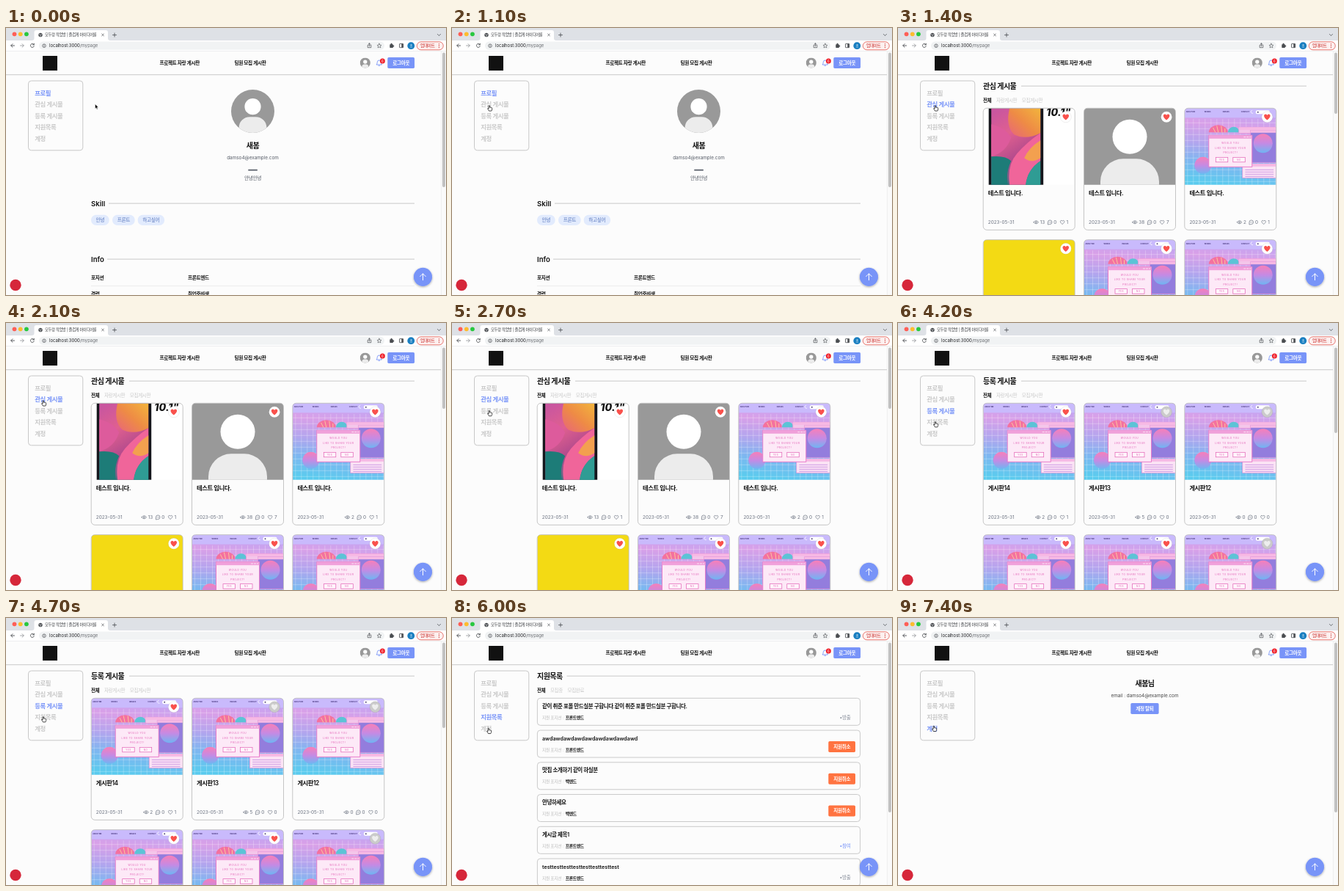
An HTML page that plays this animation: 600 px wide and 364 px high, repeating every 7.5 s.

```html
<!DOCTYPE html>
<html lang="ko">
<head>
<meta charset="utf-8">
<title>My page</title>
<style>
  html, body { margin: 0; width: 100%; height: 100%; overflow: hidden; background: #fcfcfc; }
  svg { display: block; width: 100vw; height: 100vh; }
  text { font-family: Inter, "Noto Sans CJK KR", "Noto Sans CJK JP", "Noto Sans CJK", sans-serif; white-space: pre; }
</style>
</head>
<body>
<svg id="stage" viewBox="0 0 600 364" xmlns="http://www.w3.org/2000/svg"></svg>
<script>
const LOOP = 7500;
const BLUE = '#7894f8', INK = '#111', PALE = '#c9c9c9', SLATE = '#6b7280';
const EMAIL = 'damso4@example.com', NICKNAME = '새봄';

// ---------- drawing helpers ----------
const rect = (x, y, w, h, fill, rx = 0, extra = '') =>
  `<rect x="${x}" y="${y}" width="${w}" height="${h}" rx="${rx}" fill="${fill}" ${extra}/>`;
const circle = (x, y, r, fill, extra = '') => `<circle cx="${x}" cy="${y}" r="${r}" fill="${fill}" ${extra}/>`;
const shape = (d, fill) => `<path d="${d}" fill="${fill}"/>`;
const stroke = (d, color, width = 1) =>
  `<path d="${d}" fill="none" stroke="${color}" stroke-width="${width}" stroke-linecap="round" stroke-linejoin="round"/>`;
const at = (x, y, body) => `<g transform="translate(${x} ${y})">${body}</g>`;
const scaled = (x, y, k, body) => `<g transform="translate(${x} ${y}) scale(${k})">${body}</g>`;
const use = id => `<use href="#${id}"/>`;

// y is the vertical middle of the line; Hangul is set tighter than Latin.
function text(x, y, str, { size = 6.67, fill = INK, weight = 400, anchor = 'start' } = {}) {
  const hangul = /[가-힣]/.test(str);
  const px = hangul ? size : size * 0.955;
  return `<text x="${x}" y="${y + size * 0.36}" font-size="${px}" fill="${fill}" font-weight="${weight}"
    text-anchor="${anchor}" letter-spacing="${hangul ? -0.055 * px : 0}">${str}</text>`;
}
const button = (x, y, w, label, fill = BLUE) =>
  rect(x, y, w, 15, fill, 1.7) +
  text(x + w / 2, y + 7.5, label, { fill: '#fff', weight: 600, anchor: 'middle' });
const heading = (y, label, lineX) =>
  text(116, y, label, { size: 10, weight: 600 }) + rect(lineX, y - .6, 557 - lineX, 1.6, '#dcdcdc');
const gradient = (id, stops, dir = 'x1="0" y1="0" x2="0" y2="1"') =>
  `<linearGradient id="${id}" ${dir}>${stops.map((c, i) =>
    `<stop offset="${i / (stops.length - 1)}" stop-color="${c}"/>`).join('')}</linearGradient>`;

const HEART = 'M0 3.8C-5.2 .4-4.4-3.4-2-3.4Q-.6-3.4 0-2.1Q.6-3.4 2-3.4C4.4-3.4 5.2 .4 0 3.8Z';

// ---------- pictures on the cards (125 x 104.5) ----------
const portrait = rect(0, 0, 125, 125, '#999') + circle(62.5, 49, 23.5, '#fff') +
  shape('M22.5 125V110A31 31 0 0 1 53.5 79H71.5A31 31 0 0 1 102.5 110V125Z', '#ececec');

function artwork() {
  let grid = '', keys = '';
  for (let x = 4; x < 125; x += 8) grid += `M${x} 15V105`;
  for (let y = 20; y < 105; y += 8) grid += `M0 ${y}H125`;
  for (let y = 84; y < 94; y += 3) keys += `M83 ${y}H121`;
  const tiny = (x, y, s, size) =>
    `<text x="${x}" y="${y}" font-size="${size}" fill="#e25fb4" text-anchor="middle" letter-spacing=".5">${s}</text>`;
  const nav = ['ABOUT ME', 'WORKS', 'IMAGES', 'CONTACT'].map((s, i) =>
    `<text x="${2 + 25 * i}" y="6" font-size="2.3" font-weight="700" fill="#4b3a80">${s}</text>`).join('');
  const pane = (x, y, w, h, fill) =>
    rect(x, y, w, h, fill, 0, 'stroke="#e98fd6" stroke-width=".7"') + rect(x, y, w, 3.5, '#f7b9e4');
  return rect(0, 0, 125, 105, 'url(#sky)') + stroke(grid, '#ffffff80', .5) +
    rect(0, 0, 125, 13, '#c9bafc') + nav +
    stroke('M92 3A2 2 0 1 0 93 7', '#fff', .7) + rect(97, 3, 19, 5, '#fff', 2) + circle(100, 5.5, 1, '#55477d') +
    shape('M33 33A13 10 0 0 1 59 33Z', '#f4719f') +
    stroke('M39 27L42 33M44 24.500L46 33M50 24.500L51 33M55 28L55 33', '#fbc4a0', 1) +
    shape('M59 33A8 7.500 0 0 1 75 33Z', '#5cc3d6') +
    pane(74, 26, 52, 8, '#f4c6ea') +
    pane(90, 30, 36, 44, '#937ddd') + circle(107, 48, 13, 'url(#ball)') +
    pane(79, 76, 46, 19, '#fbe3f5') + stroke(keys, '#cf9be4', 1) +
    circle(25, 78, 11.5, 'url(#ball)') +
    rect(33, 37, 59, 43, '#fde9f7', 0, 'stroke="#e774c6" stroke-width=".9"') + rect(33, 37, 59, 4.5, '#f0a0da') +
    stroke('M81 39.300H83M85 39.300H87M89 39.300H90', '#fff', .7) +
    tiny(62.5, 49, 'WOULD YOU', 3.2) + tiny(62.5, 55.5, 'LIKE TO SHARE YOUR', 3.2) + tiny(62.5, 62, 'PROJECT!', 3.2) +
    [42.5, 66].map(x => rect(x, 67, 16.5, 6.5, '#fff5fb', 0, 'stroke="#e25fb4" stroke-width=".7"')).join('') +
    tiny(50.8, 71.4, 'YES', 3) + tiny(74.3, 71.4, 'NO', 3);
}

// a tablet lying on white, its screen a swirl of soft bands
const tablet = rect(0, 0, 125, 105, '#fff') + rect(7.5, 0, 74.5, 105, '#16171d') +
  rect(11, 0, 67, 105, 'url(#screen)') +
  shape('M36 0H78V34Q58 44 42 36Q30 24 36 0Z', 'url(#amber)') +
  shape('M11 22Q30 26 38 40Q32 60 11 66Z', '#dd5b9c') +
  shape('M78 34Q60 46 46 62T36 105H58Q60 84 78 72Z', '#f0659a') +
  shape('M78 44Q62 54 56 68Q66 76 78 68Z', '#f3a04f') +
  shape('M11 66Q30 64 38 72Q30 90 34 105H11Z', '#1d7c78') +
  shape('M78 72Q60 84 58 105H78Z', '#2f9c94') +
  '<text x="86" y="11" font-size="14" font-weight="800" font-style="italic" fill="#111">10.1"</text>';

const defs = `<defs>
  ${gradient('sky', ['#bda6f4', '#d9a0e8', '#b3a5ee', '#7db7f0', '#5bcbee'], 'x1=".6" y1="0" x2=".45" y2="1"')}
  ${gradient('ball', ['#f77fb8', '#c58ae4', '#6fb5f2'])}
  ${gradient('screen', ['#c9569f', '#e0608f', '#b24a8d', '#2a7d7f'], 'x1=".2" y1="0" x2=".6" y2="1"')}
  ${gradient('amber', ['#f2b53c', '#ee8b45', '#e8647c'], 'x1="1" y1="0" x2="0" y2="1"')}
  <clipPath id="cover"><path d="M0 104.500V5Q0 0 5 0H120Q125 0 125 5V104.500Z"/></clipPath>
  <clipPath id="disc"><circle cx="62.500" cy="62.500" r="62.500"/></clipPath>
  <filter id="soft" x="-50%" y="-50%" width="200%" height="200%">
    <feDropShadow dx="0" dy="1" stdDeviation="1.500" flood-opacity=".35"/></filter>
  <g id="portrait">${portrait}</g>
  <g id="round"><g clip-path="url(#disc)">${portrait}</g></g>
  <g id="artwork">${artwork()}</g>
  <g id="tablet">${tablet}</g>
  <g id="yellow">${rect(0, 0, 125, 105, '#f3da14')}</g>
</defs>`;

// ---------- browser window and site header ----------
function chrome() {
  const dark = '#4a4d51';
  return rect(0, 0, 600, 17, '#dee1e6') +
    ['#ff5f57', '#febc2e', '#28c840'].map((c, i) => circle(11.5 + 8.2 * i, 8.3, 2.9, c)).join('') +
    shape('M35 17Q38.500 17 38.500 14V6Q38.500 3 41.500 3H136Q139 3 139 6V14Q139 17 142 17Z', '#fff') +
    circle(47, 9.5, 2.7, dark) + stroke('M45.500 8.500L47 9.700L48.500 8.700M46.500 11L47.500 11', '#fff', .6) +
    text(53, 9.5, '모두랑 작업방 | 즐겁게 아이디어를', { size: 5.3, fill: '#33363a' }) +
    stroke('M130.600 8L133.400 10.800M133.400 8L130.600 10.800', dark, .7) +
    stroke('M145.500 9.500H150.500M148 7V12', dark, .8) + stroke('M588.500 8.500L590.500 10.500L592.500 8.500', dark, .8) +
    rect(0, 17, 600, 14.5, '#fff') +
    stroke('M11.500 24H6.800M9 21.700L6.700 24L9 26.300', dark, .9) +
    stroke('M19.500 24H24.200M22 21.700L24.300 24L22 26.300', '#9a9da1', .9) +
    stroke('M37.800 22.300A2.500 2.500 0 1 0 38.300 24.700M38.300 21.300V22.900H36.600', dark, .9) +
    rect(45, 18.5, 471, 11.3, '#f1f3f4', 5.6) +
    circle(52, 24.2, 2.3, 'none', `stroke="${dark}" stroke-width=".7"`) + stroke('M52 24V25.300M52 22.900V23', dark, .7) +
    `<text x="59" y="26.300" font-size="5.900" fill="#202124">localhost:3000<tspan fill="#6b6e73">/mypage</tspan></text>` +
    stroke('M494.300 23.300H493.200V26.700H497.800V23.300H496.700M495.500 25V20.900M494.100 22.200L495.500 20.800L496.900 22.200', dark, .7) +
    stroke('M509 21.200L509.900 23.200L512 23.400L510.400 24.800L510.900 26.900L509 25.800L507.100 26.900L507.600 24.800L506 23.400L508.100 23.200Z', dark, .6) +
    rect(523.3, 22.3, 4.6, 4.6, dark, .6) + circle(525.6, 21.9, 1.1, dark) + circle(528.2, 24.6, 1.1, dark) +
    rect(536.5, 21.5, 5.2, 5.2, 'none', .5, `stroke="${dark}" stroke-width=".8"`) + rect(539.3, 21.5, 2.4, 5.2, dark) +
    circle(552.3, 24.2, 4.9, '#1a7fc1') + text(552.3, 24.2, '초', { size: 4.4, fill: '#fff', anchor: 'middle' }) +
    rect(560.3, 18.8, 36, 11, '#fdf0ef', 5.5, 'stroke="#e0574d" stroke-width=".8"') +
    text(565, 24.2, '업데이트', { size: 5.7, fill: '#c5221f', weight: 500 }) +
    [21.8, 24.2, 26.6].map(y => circle(590.5, y, .65, '#c5221f')).join('') +
    rect(0, 31.2, 600, .6, '#e3e4e6');
}

function header() {
  const nav = { weight: 600 };
  return rect(0, 63, 593, 1, '#d4d4d4') + rect(0, 64, 593, 1, '#f1f1f1') +
    rect(50, 38, 20, 20, INK) +
    text(209.5, 47.5, '프로젝트 자랑 게시판', nav) + text(311.5, 47.5, '팀원 모집 게시판', nav) +
    scaled(482.7, 40.5, 14.2 / 125, use('round')) +
    stroke('M505.300 49.700Q506.300 48.500 506.300 46.500Q506.500 44 508.800 44Q511.100 44 511.300 46.500Q511.300 48.500 512.300 49.700ZM508 51.300H509.600', BLUE, .9) +
    circle(513.4, 45, 3.5, '#f0222b') + text(513.4, 45, '6', { size: 4.5, fill: '#fff', anchor: 'middle' }) +
    button(520.3, 40, 36.8, '로그아웃');
}

const MENU = ['프로필', '관심 게시물', '등록 게시물', '지원목록', '계정'];
const sidebar = active => rect(30.5, 72, 74.3, 94.8, 'none', 4, 'stroke="#c8c8c8"') +
  MENU.map((label, i) => text(39.3, 88.5 + 15.5 * i, label,
    { size: 8.4, weight: 600, fill: i === active ? BLUE : PALE })).join('');

const floating = () => circle(13, 350.5, 7.7, '#d6273a') +
  circle(568.5, 339.3, 12.6, BLUE, 'filter="url(#soft)"') +
  stroke('M568.500 343.700V335M564.700 338.700L568.500 334.900L572.300 338.700', '#fff', 1);

const scrollbar = bottom => rect(593, 31.8, 7, 333, '#fafafa') + rect(593, 31.8, .6, 333, '#e8e8e8') +
  rect(595, 33.5, 4, bottom - 33.5, '#c1c1c1', 2);

// ---------- pages ----------
function profilePage() {
  const center = { anchor: 'middle', fill: '#555b66' };
  const tags = [['안녕', 116, 24.7], ['프론트', 145, 30.7], ['하고싶어', 179.6, 36.5]];
  const rows = [['포지션', '프론트엔드', 341], ['경력', '취업준비생', 362.5]];
  return scaled(307, 84, 59 / 125, use('round')) +
    text(336.5, 160.5, NICKNAME, { size: 10, weight: 700, anchor: 'middle' }) +
    text(336.5, 176.5, EMAIL, center) + rect(330.3, 192.8, 12.5, 1.7, '#555b66') +
    text(336.5, 204.5, '안녕안녕', center) + heading(239, 'Skill', 140) +
    tags.map(([label, x, w]) => rect(x, 254.7, w, 14.3, '#e2ebfd', 7) +
      text(x + w / 2, 261.8, label, { anchor: 'middle', fill: '#5876bd' })).join('') +
    heading(315, 'Info', 138) +
    rows.map(([key, value, y]) => text(116, y, key, { weight: 600 }) + text(248, y, value, { weight: 600 })).join('') +
    rect(116, 351.5, 441, .6, '#e2e2e2');
}

const filters = labels => {
  let x = 116;
  return labels.map((label, i) => {
    const out = text(x, 98.5, label, { size: 6.55, weight: i ? 400 : 600, fill: i ? PALE : INK });
    x += label.length * 5.66 + 6.6;
    return out;
  }).join('');
};

function card(x, y, [picture, liked, title, views = 0, comments = 0, likes = 0]) {
  const crop = picture === 'portrait' ? -10 : 0;
  const numberWidth = n => [...String(n)].reduce((w, d) => w + (d === '1' ? 2.8 : 4.1), 0);
  const number = (end, n) => text(end, 155.5, String(n), { anchor: 'end', fill: SLATE });
  const heartX = 116 - numberWidth(likes) - 5.3, commentEnd = heartX - 7.8;
  const commentX = commentEnd - numberWidth(comments) - 5, viewEnd = commentX - 7;
  const eyeX = viewEnd - numberWidth(views) - 5;
  return at(x, y,
    rect(0, 0, 125, 166, '#fcfcfc', 5) +
    `<g clip-path="url(#cover)">${at(0, crop, use(picture))}</g>` +
    rect(0, 0, 125, 166, 'none', 5, 'stroke="#bfbfbf" stroke-width=".9"') +
    at(112.6, 12, circle(0, 0, 7.5, liked ? '#fff' : '#cbcbcb', 'stroke="#0002" stroke-width=".5"') +
      `<path d="${HEART}" transform="scale(1.1)" fill="${liked ? '#f9514c' : '#eeeeee'}"/>`) +
    text(6.6, 116, title, { size: 8.33, weight: 600 }) +
    text(6.6, 155.5, '2023-05-31', { fill: SLATE }) +
    at(eyeX, 155.5, stroke('M-3.300 0Q0-4.200 3.300 0Q0 4.200-3.300 0Z', SLATE, .7) +
      circle(0, 0, 1, 'none', `stroke="${SLATE}" stroke-width=".7"`)) + number(viewEnd, views) +
    at(commentX, 155.5, stroke('M-2.800 2.800V0A2.800 2.800 0 1 1 0 2.800Z', SLATE, .7) +
      stroke('M-1.200 0H-1.100M0 0H.1M1.200 0H1.300', SLATE, .7)) + number(commentEnd, comments) +
    at(heartX, 155.5, `<path d="${HEART}" transform="scale(.7)" fill="none" stroke="${SLATE}"/>`) + number(116, likes));
}

const cardsPage = (title, cards) => heading(79, title, 168) + filters(['전체', '자랑게시판', '모집게시판']) +
  cards.map((c, i) => card(116.2 + 137.3 * (i % 3), 109.3 + 179.4 * Math.floor(i / 3), c)).join('');

const likedPage = () => cardsPage(MENU[1], [
  ['tablet', true, '테스트 입니다.', 13, 0, 1], ['portrait', true, '테스트 입니다.', 38, 0, 7],
  ['artwork', true, '테스트 입니다.', 2, 0, 1],
  ['yellow', true, ''], ['artwork', true, ''], ['artwork', true, '']]);
const ownPage = () => cardsPage(MENU[2], [
  ['artwork', true, '게시판14', 2, 0, 1], ['artwork', false, '게시판13', 5, 0, 0],
  ['artwork', false, '게시판12', 0, 0, 0],
  ['artwork', true, ''], ['artwork', true, ''], ['artwork', false, '']]);

function appliedPage() {
  const rows = [
    ['같이 취준 포폴 만드실분 구합니다.'.repeat(2), '프론트엔드', '방출'],
    ['awd'.repeat(9), '프론트엔드'],
    ['맛집 소개하기 같이 하실분', '백엔드'],
    ['안녕하세요', '백엔드'],
    ['게시글 제목1', '프론트엔드', '참여'],
    ['test'.repeat(8), '프론트엔드', '방출']];
  return heading(79, MENU[3], 156.5) + filters(['전체', '모집중', '모집완료']) +
    rows.map(([title, role, state], i) => at(0, 109.3 + 43.75 * i,
      rect(116.4, 0, 440.2, 37, '#fcfcfc', 4, 'stroke="#c4c4c4" stroke-width=".9"') +
      text(123, 11, title, { size: 7.5, weight: 600 }) +
      text(123, 26.5, '지원 포지션 :', { size: 5.8, fill: '#bcbcbc' }) +
      text(154.8, 26.5, role, { size: 5.8, weight: 600 }) +
      (state ? text(543.5, 26, '•' + state, { anchor: 'end', fill: state === '참여' ? BLUE : '#858b98' })
             : button(513.3, 15, 36.7, '지원취소', '#ff7340')))).join('');
}

const accountPage = () =>
  text(336.5, 89.8, NICKNAME + '님', { size: 10, weight: 700, anchor: 'middle' }) +
  text(336.5, 105.5, 'email : ' + EMAIL, { anchor: 'middle', fill: '#444' }) +
  button(317.3, 116, 38.3, '계정 탈퇴');

// ---------- timeline ----------
const PAGES = [
  { start: 0, draw: profilePage, thumb: 217 },
  { start: 1200, draw: likedPage, thumb: 117 },
  { start: 2900, draw: ownPage, thumb: 150 },
  { start: 4800, draw: appliedPage, thumb: 265 },
  { start: 6100, draw: accountPage, thumb: 265 }];

// time, x, y of the pointer tip
const PATH = [
  [0, 121.5, 103.7], [50, 121.5, 103.7], [650, 50.8, 105.5], [2150, 50.8, 105.5], [2600, 50.8, 119.2],
  [3650, 50.8, 119.2], [4150, 50.8, 134.3], [5250, 50.8, 134.3], [5850, 49.8, 150],
  [6050, 49.8, 150], [6200, 48.8, 147], [LOOP, 48.8, 147]];

const ARROW = '<path d="M0 0V6.300L1.500 5L2.500 7.300L3.600 6.800L2.600 4.600H4.500Z" fill="#000" stroke="#fff" stroke-width=".5"/>';
const HAND = '<path d="M-.8 .7Q0-.4 .7 .7V3Q1.500 2.400 2 3.200Q2.800 2.700 3.200 3.500Q4.200 3.200 4.200 4.300V6Q4.100 7.200 3.300 8.400H-.4Q-1.300 6.700-2.500 5Q-2.500 3.800-.8 4.900Z" transform="scale(.9)" fill="#fff" stroke="#000" stroke-width=".8" stroke-linejoin="round"/>';

const stage = document.getElementById('stage');
stage.innerHTML = defs + rect(0, 0, 600, 364, '#fcfcfc') +
  PAGES.map((p, i) => `<g class="page">${p.draw()}${sidebar(i)}${scrollbar(p.thumb)}</g>`).join('') +
  header() + chrome() + floating() +
  `<g id="pointer"><g id="arrow">${ARROW}</g><g id="hand">${HAND}</g></g>`;

const pages = [...stage.querySelectorAll('.page')];
const [pointer, arrow, hand] = ['pointer', 'arrow', 'hand'].map(id => document.getElementById(id));
const show = (node, on) => node.setAttribute('visibility', on ? 'visible' : 'hidden');

function pointerAt(t) {
  const i = PATH.findIndex(([time]) => time > t);
  const [t0, x0, y0] = PATH[i - 1], [t1, x1, y1] = PATH[i];
  const u = (t - t0) / (t1 - t0), k = u * u * (3 - 2 * u);
  return [x0 + (x1 - x0) * k, y0 + (y1 - y0) * k];
}

function frame(now) {
  const t = now % LOOP;
  const current = PAGES.findLastIndex(p => t >= p.start);
  pages.forEach((node, i) => show(node, i === current));
  const [x, y] = pointerAt(t);
  pointer.setAttribute('transform', `translate(${x} ${y})`);
  show(arrow, x > 79);
  show(hand, x <= 79);
}

let origin;
function tick(now) {
  origin ??= now;
  frame(Math.max(0, now - origin));
  requestAnimationFrame(tick);
}
frame(0);
requestAnimationFrame(tick);
</script>
</body>
</html>
```
